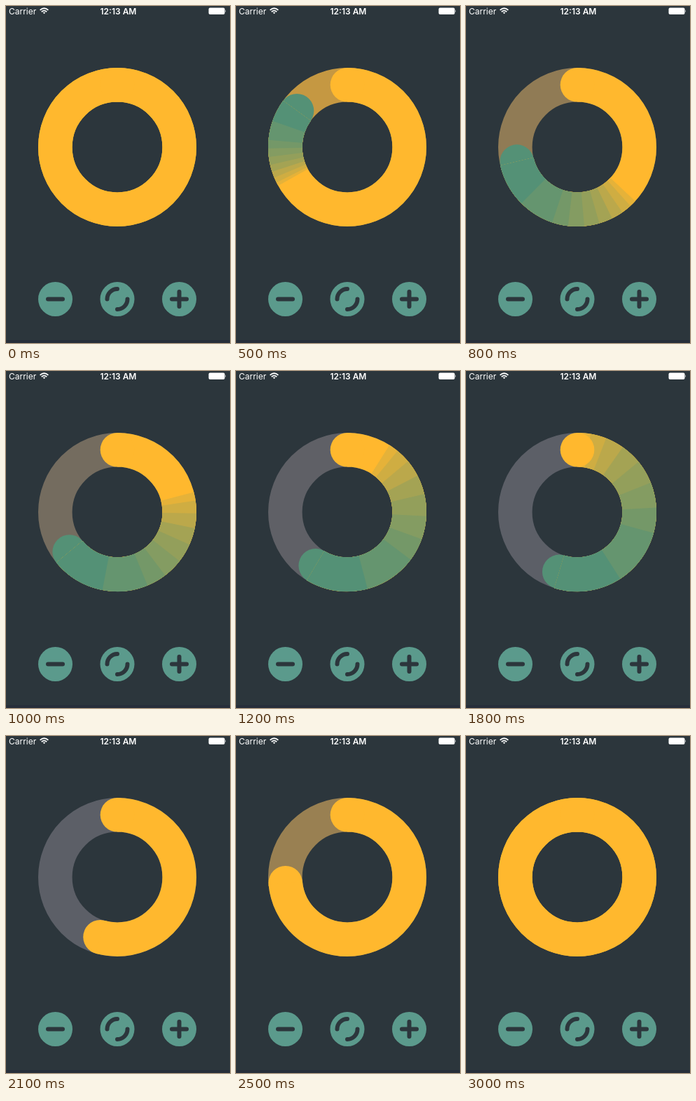
Recreate the animation shown at these times as an HTML page with a canvas. Size 320x480 px, loop 3.1 s.

```html
<!DOCTYPE html>
<html lang="en">
<head>
<meta charset="utf-8">
<title>Ring progress</title>
<style>
  html, body { margin: 0; height: 100%; overflow: hidden; background: #2c363c; }
  svg, canvas { position: absolute; left: 0; top: 0; width: 320px; height: 480px; }
  text { font: 12px Inter, Roboto, sans-serif; fill: #fff; }
  .icon { fill: none; stroke: #2c363c; stroke-width: 6; stroke-linecap: round; }
  .wifi { fill: none; stroke: #fff; stroke-width: 1.8; }
</style>
</head>
<body>
<svg viewBox="0 0 320 480">
  <rect y="476" width="320" height="4" fill="#272e3a"/>
  <text x="4" y="11.5">Carrier</text>
  <text x="160.5" y="11.5" text-anchor="middle" style="font-weight:600">12:13 AM</text>
  <g class="wifi">
    <path d="M48.6 5.9Q54.5 .6 60.4 5.9M50.8 8.2Q54.5 5 58.2 8.2"/>
    <path d="M52.7 9.3Q54.5 8 56.3 9.3L54.5 11.3Z" fill="#fff" stroke="none"/>
  </g>
  <rect x="289.5" y="2.5" width="23" height="9.5" rx="2" fill="#fff"/>
  <path d="M313.3 5.5q1.7 1.7 0 3.6z" fill="#fff"/>
  <g fill="#5b9a8c">
    <circle cx="70.5" cy="417.5" r="24.5"/>
    <circle cx="159" cy="417.5" r="24.5"/>
    <circle cx="247.5" cy="417.5" r="24.5"/>
  </g>
  <path class="icon" d="M60 417.5h21M237 417.5h21M247.5 407v21M144.5 417.5a14.5 14.5 0 0 1 14.5-14.5M173.5 417.5a14.5 14.5 0 0 1-14.5 14.5"/>
</svg>
<canvas></canvas>
<script>
const LOOP = 3100, CX = 159, CY = 201, RADIUS = 88.7, WIDTH = 48.6;
const YELLOW = [255, 184, 46], GREEN = [84, 145, 118], GREY = [92, 95, 103];
const DROP = 164;             // degrees removed from the full ring
const FADE_END = 2050, REFILL = 2100, REFILL_TIME = 900;
// Keys of the emptying move: time, share done
const KEYS = [[100, 0], [500, .33], [800, .63], [1200, .91], [1600, .978], [2000, 1]];
// Colour bands: start within the gradient, share of green
const BANDS = [[0, .15], [.04, .28], [.1, .4], [.17, .53], [.25, .63], [.34, .72], [.435, .81], [.53, .9], [.745, 1]];

const canvas = document.querySelector('canvas');
const ctx = canvas.getContext('2d');
const scale = window.devicePixelRatio || 1;
canvas.width = 320 * scale;
canvas.height = 480 * scale;
ctx.scale(scale, scale);

const mix = (a, b, k) => `rgb(${a.map((v, i) => Math.round(v + (b[i] - v) * k))})`;
const rad = deg => (deg - 90) * Math.PI / 180;

function slope(i) {
  const a = KEYS[i - 1], b = KEYS[i + 1];
  if (!a) return .0006;
  return b ? (b[1] - a[1]) / (b[0] - a[0]) : 0;
}

// Smooth cubic through the keys
function emptied(t) {
  if (t <= KEYS[0][0]) return 0;
  const i = KEYS.findIndex(key => key[0] > t) - 1;
  if (i < 0) return 1;
  const [t0, y0] = KEYS[i], [t1, y1] = KEYS[i + 1], h = t1 - t0, u = (t - t0) / h;
  return y0 + (y1 - y0) * u * u * (3 - 2 * u)
    + h * u * (1 - u) * ((1 - u) * slope(i) - u * slope(i + 1));
}

function level(t) {
  if (t < REFILL) return Math.min(1, emptied(t));
  const u = Math.min(1, (t - REFILL) / REFILL_TIME);
  return 1 - u * u * (3 - 2 * u);
}

function arc(from, to, color) {
  ctx.beginPath();
  ctx.arc(CX, CY, RADIUS, rad(from), rad(to));
  ctx.lineWidth = WIDTH;
  ctx.strokeStyle = color;
  ctx.stroke();
}

function cap(deg, color) {
  ctx.beginPath();
  ctx.arc(CX + RADIUS * Math.cos(rad(deg)), CY + RADIUS * Math.sin(rad(deg)), WIDTH / 2, 0, 7);
  ctx.fillStyle = color;
  ctx.fill();
}

function draw(t) {
  const done = level(t), end = 360 - DROP * done;
  const graded = t < FADE_END && done > 0;
  ctx.clearRect(0, 0, 320, 480);
  arc(0, 360, mix(YELLOW, GREY, Math.min(1, done * 1.08)));
  cap(end, mix(YELLOW, GREEN, graded ? 1 : 0));
  arc(0, end, mix(YELLOW, GREEN, 0));
  if (graded) {
    const start = 360 * (1 - done);
    for (const [at, green] of BANDS) arc(start + (end - start) * at, end, mix(YELLOW, GREEN, green));
  }
  cap(0, mix(YELLOW, GREEN, 0));
}

function tick() {
  draw(performance.now() % LOOP);
  requestAnimationFrame(tick);
}
tick();
</script>
</body>
</html>
```
